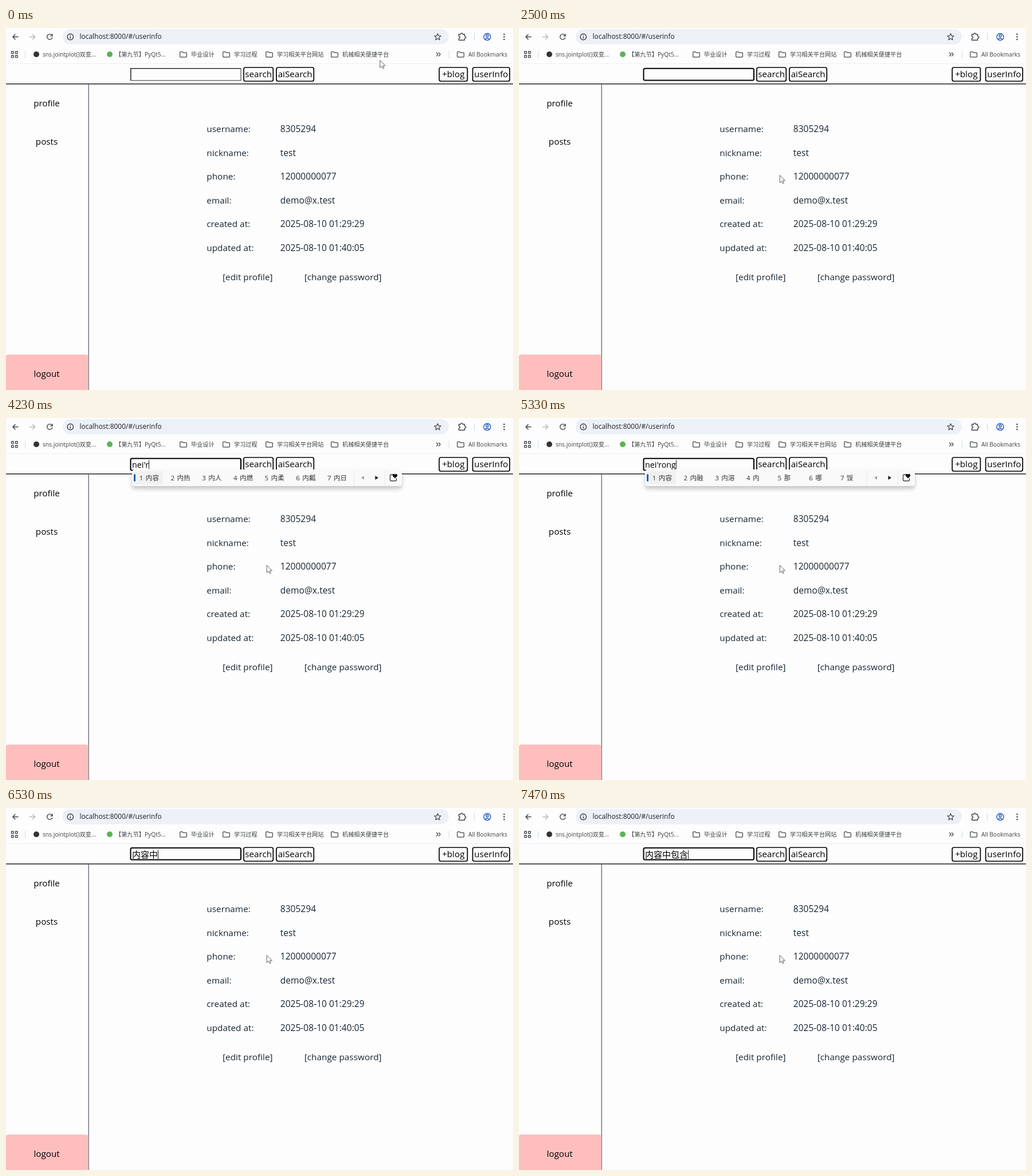
Recreate the animation shown at these times as an HTML page. Size 885 by 633 pixels, loop 8000 ms.

```html
<!DOCTYPE html>
<html lang="zh-CN">
<head>
<meta charset="utf-8">
<title>userinfo</title>
<style>
  html, body { margin: 0; width: 100%; height: 100%; overflow: hidden; background: #fdfdfd; }
  svg { display: block; width: 100vw; height: 100vh; }
  text { font-family: "Open Sans", "Noto Sans CJK SC", "Noto Sans CJK", sans-serif; font-size: 15.2px; white-space: pre; }
  .url { font-size: 11.95px; fill: #1f2023; }
  .mark text { font-size: 10.2px; fill: #3c4043; }
  .info text { font-size: 15.35px; fill: #182633; }
  .info .value { font-size: 15.55px; }
  .mid { text-anchor: middle; }
  .line { fill: none; stroke: #3f4347; stroke-width: 1.4; stroke-linecap: round; stroke-linejoin: round; }
  .box { fill: #fdfdfd; stroke: #000; stroke-width: 1.7; }
  .cands text { font-size: 11.6px; fill: #333; }
  #done { font-size: 15px; }
  #typed { font-size: 14.3px; }
</style>
</head>
<body>
<svg viewBox="0 0 885 633" preserveAspectRatio="none">
  <defs>
    <filter id="shadow" x="-5%" y="-50%" width="110%" height="220%">
      <feDropShadow dx="0" dy="5" stdDeviation="3.8" flood-color="#000" flood-opacity=".22"/>
    </filter>
    <path id="folder" class="line" style="stroke-width:1.2" d="M.7 1.6q0-1 1-1h3.2l1.5 1.6h5q1 0 1 1v5.6q0 1-1 1H1.7q-1 0-1-1z"/>
  </defs>

  <rect width="885" height="633" fill="#fdfdfd"/>

  <!-- address bar -->
  <rect x="99" y="2" width="674" height="26.5" rx="13.2" fill="#ecf0f7"/>
  <path class="line" d="M21 15.5H12.2M16 11.3 11.8 15.5 16 19.7"/>
  <path class="line" style="stroke:#b4b7bb" d="M41.5 15.5h8.8M46.5 11.3l4.2 4.2-4.2 4.2"/>
  <path class="line" d="M80.2 12.6A4.7 4.7 0 1 0 80.8 17M81 10.6v3.3h-3.3"/>
  <circle class="line" cx="112.3" cy="15.5" r="5.2"/>
  <path class="line" d="M112.3 15.2v2.8M112.3 12.7v.2"/>
  <text class="url" x="128.5" y="19.4">localhost:8000/#/userinfo</text>
  <path id="star" class="line" style="stroke-width:1.2"/>
  <path class="line" d="M790.5 11h3.2q.2-2 1.8-2t1.8 2h3.2v3.4q2.2.2 2.2 1.9t-2.2 1.9v3h-10v-3q2-.3 2-1.9t-2-1.9z"/>
  <path d="M817.5 9v13" stroke="#c9d9f2"/>
  <g class="line" style="stroke:#2459b8">
    <circle cx="840" cy="15.5" r="6"/>
    <circle cx="840" cy="13.8" r="2"/>
    <path d="M836 19.8q4-3.4 8 0"/>
  </g>
  <g fill="#3f4347"><circle cx="869.5" cy="11" r="1.3"/><circle cx="869.5" cy="15.5" r="1.3"/><circle cx="869.5" cy="20" r="1.3"/></g>

  <!-- bookmarks -->
  <g class="line" style="stroke-width:1.3">
    <path d="M9.5 41h3.6v3.6H9.5zM16.5 41h3.6v3.6h-3.6zM9.5 48h3.6v3.6H9.5zM16.5 48h3.6v3.6h-3.6z"/>
    <path d="M751.5 43.3l2.6 2.9-2.6 2.9M755.5 43.3l2.6 2.9-2.6 2.9"/>
  </g>
  <path d="M33.5 40v13M773.5 40v13" stroke="#cfdcf0"/>
  <circle cx="53" cy="46" r="5" fill="#333"/>
  <circle cx="181" cy="46" r="5" fill="#5cb355"/>
  <g id="marks" class="mark"></g>
  <path d="M0 62.5h885" stroke="#eceef0"/>

  <!-- page -->
  <path d="M0 97.8h885" stroke="#222" stroke-width="1.4"/>
  <path d="M144.2 98v535" stroke="#666c7c" stroke-width="1.4"/>
  <path d="M0 633v-58q0-4 4-4h135q4.5 0 4.5 4v58z" fill="#febebe"/>
  <g class="mid">
    <text x="71" y="137">profile</text>
    <text x="71" y="203.5">posts</text>
    <text x="71" y="609.5">logout</text>
  </g>
  <g id="info" class="info"></g>
  <g id="buttons" class="mid"></g>

  <!-- search field -->
  <g id="inset" fill="none" stroke-width="1.6">
    <path d="M410 71v20.8H218" stroke="#767676"/>
    <path d="M217.8 92V70.8H410" stroke="#2c2c2c"/>
  </g>
  <rect id="ring" class="box" style="stroke-width:2" x="217.5" y="70.7" width="192.5" height="20.8" rx="2.5"/>
  <text id="entry" x="220" y="86.5"><tspan id="done"></tspan><tspan id="typed"></tspan></text>
  <path id="caret" d="M.5 73.5V89" stroke="#222"/>

  <!-- candidate window, origin at its left edge -->
  <g id="popup">
    <rect y="90" width="471" height="29" rx="5" fill="#f9f9f9" filter="url(#shadow)"/>
    <rect x="3" y="93" width="51" height="23" rx="3" fill="#f0f0f0"/>
    <rect x="3" y="98" width="3" height="13" rx="1.5" fill="#005fb8"/>
    <path d="M387.5 91v27M441.5 91v27" stroke="#e8e8e8"/>
    <path d="M405 101v7l-5-3.5z" fill="#a5a5a5"/>
    <path d="M424.5 101v7l5.500-3.5z" fill="#111"/>
    <path class="line" d="M456 99h-3.5q-2 0-2 2v7q0 2 2 2h7q2 0 2-2v-2"/>
    <path d="M459 105.5l-3.6-3.6q-1.5-2 .2-3.6 1.800-1.3 3.4.5 1.6-1.8 3.4-.5 1.7 1.6.2 3.6z" fill="#111"/>
    <g id="cands" class="cands"></g>
  </g>

  <path id="arrow" d="M.5.5v13l3-2.8 2.1 4.2 2-.9-2-4.1h4.1z" fill="#fff" stroke="#4a4a55" stroke-width=".9" stroke-linejoin="round"/>
  <path id="beam" d="M-3.5-6.5H-1l1 1 1-1h2.5M0-5.5v11M-3.5 6.5H-1l1-1 1 1h2.5" fill="none" stroke="#111" stroke-width="1.2"/>
</svg>

<script>
const LOOP = 8000, BLINK = 530, FOCUS = 870, TEXT_X = 220, PITCH = 54.7;
const $ = id => document.getElementById(id);
const label = (x, y, text, cls = '') => `<text x="${x}" y="${y}" class="${cls}">${text}</text>`;

$('star').setAttribute('d', 'M' + Array.from({ length: 10 }, (_, i) => {
  const r = i % 2 ? 2.7 : 6, a = i * Math.PI / 5;
  return [753.5 + r * Math.sin(a), 15.8 - r * Math.cos(a)].map(v => v.toFixed(1));
}).join('L') + 'z');

const folders = [[323, '毕业设计'], [398, '学习过程'], [473, '学习相关平台网站'], [587, '机械相关便捷平台'], [807, 'All Bookmarks']];
$('marks').innerHTML = label(64, 50.3, 'sns.jointplot()双变...') + label(191, 50.3, '【第九节】PyQt5...') +
  folders.map(([x, name]) => `<use href="#folder" x="${x - 20}" y="41"/>` + label(x, 50.3, name)).join('');

const rows = [['username', '8305294'], ['nickname', 'test'], ['phone', '12000000077'], ['email', 'demo@x.test'],
  ['created at', '2025-08-10 01:29:29'], ['updated at', '2025-08-10 01:40:05']];
$('info').innerHTML = rows.map(([name, value], i) => {
  const y = 182 + i * 41.5;
  return label(350.3, y, name + ':') + label(478.8, y, value, 'value');
}).join('') + label(378, 440.5, '[edit profile]') + label(520.7, 440.5, '[change password]');

const buttons = [[415, 51.3, 'search'], [472, 65.3, 'aiSearch'], [756.2, 49.2, '+blog'], [814.6, 64.6, 'userInfo']];
$('buttons').innerHTML = buttons.map(([x, w, name]) =>
  `<rect class="box" x="${x}" y="69" width="${w}" height="24" rx="3"/>` + label(x + w / 2, 86.4, name)).join('');

// time, committed text, letters being typed, candidates
const keys = [
  [FOCUS, '', '', ''],
  [3770, '', 'n', '你 那 呢 能 年 内 女'],
  [3930, '', 'ne', '呢 哪 讷 内 能 嫩 那'],
  [4070, '', 'nei', '内 那 哪 馁 内部 内心 内在'],
  [4230, '', "nei'r", '内容 内热 内人 内燃 内柔 内瓤 内日'],
  [5000, '', "nei'ro", '内容 内柔 内肉 内揉 内 那 哪'],
  [5170, '', "nei'ron", '内容 内融 内溶 内 那 哪 馁'],
  [5330, '', "nei'rong", '内容 内融 内溶 内 那 哪 馁'],
  [5630, '内容', '', ''],
  [5930, '内容', 'z', '在 中 这 做 再 赞 之'],
  [6170, '内容', 'zh', '这 中 只 着 主 找 种'],
  [6230, '内容', 'zho', '中 种 重 周 众 州 终'],
  [6300, '内容', 'zhon', '中 种 重 众 终 钟 忠'],
  [6370, '内容', 'zhong', '中 种 重 众 终 钟 忠'],
  [6500, '内容中', '', ''],
  [6700, '内容中', 'b', '不 把 被 吧 比 别 本'],
  [6800, '内容中', 'ba', '把 吧 八 爸 巴 拔 罢'],
  [6900, '内容中', 'bao', '包 报 爆 宝 保 堡 抱'],
  [7070, '内容中包', '', ''],
  [7170, '内容中包', 'h', '和 会 好 还 很 后 或'],
  [7270, '内容中包', 'ha', '哈 还 蛤 含 喊 海 好'],
  [7370, '内容中包', 'han', '含 汉 喊 汗 寒 函 韩'],
  [7470, '内容中包含', '', '']
];

// start, end, from, to
const moves = [[0, 570, [652.3, 56], [344.5, 76.5]], [870, 1470, [344.5, 76.5], [454.7, 257]]];

const show = (el, on) => el.style.display = on ? '' : 'none';
const place = (el, x, y = 0) => el.setAttribute('transform', `translate(${x} ${y})`);

function pointer(t) {
  const [start, end, from, to] = moves.findLast(m => t >= m[0]);
  const p = Math.min(1, (t - start) / (end - start)), e = p * p * (3 - 2 * p);
  return from.map((v, i) => v + (to[i] - v) * e);
}

let current = null;
function type(key) {
  const [, done, typed, words] = key || [0, '', '', ''];
  $('done').textContent = done;
  $('typed').textContent = typed;
  place($('caret'), TEXT_X + (done + typed ? $('entry').getComputedTextLength() : 0));
  show($('inset'), !key);
  show($('ring'), key);
  // the taller Chinese line box lifts the field a little
  place($('ring'), 0, done ? -1 : 0);
  show($('popup'), words);
  place($('popup'), TEXT_X + 15 * done.length);
  $('cands').innerHTML = words && words.split(' ').map((word, i) =>
    label(12.8 + i * PITCH, 108.8, i + 1) + label(23.8 + i * PITCH, 108.8, word)).join('');
}

function draw() {
  const t = performance.now() % LOOP;
  const key = keys.findLast(k => t >= k[0]);
  if (key !== current) type(current = key);
  show($('caret'), key && (t - key[0]) % (2 * BLINK) < BLINK + 10);

  const [x, y] = pointer(t);
  const overField = x > 217 && x < 410 && y > 70 && y < 92;
  show($('beam'), overField);
  show($('arrow'), !overField);
  place($(overField ? 'beam' : 'arrow'), x, y);
  requestAnimationFrame(draw);
}
type();
draw();
</script>
</body>
</html>
```
